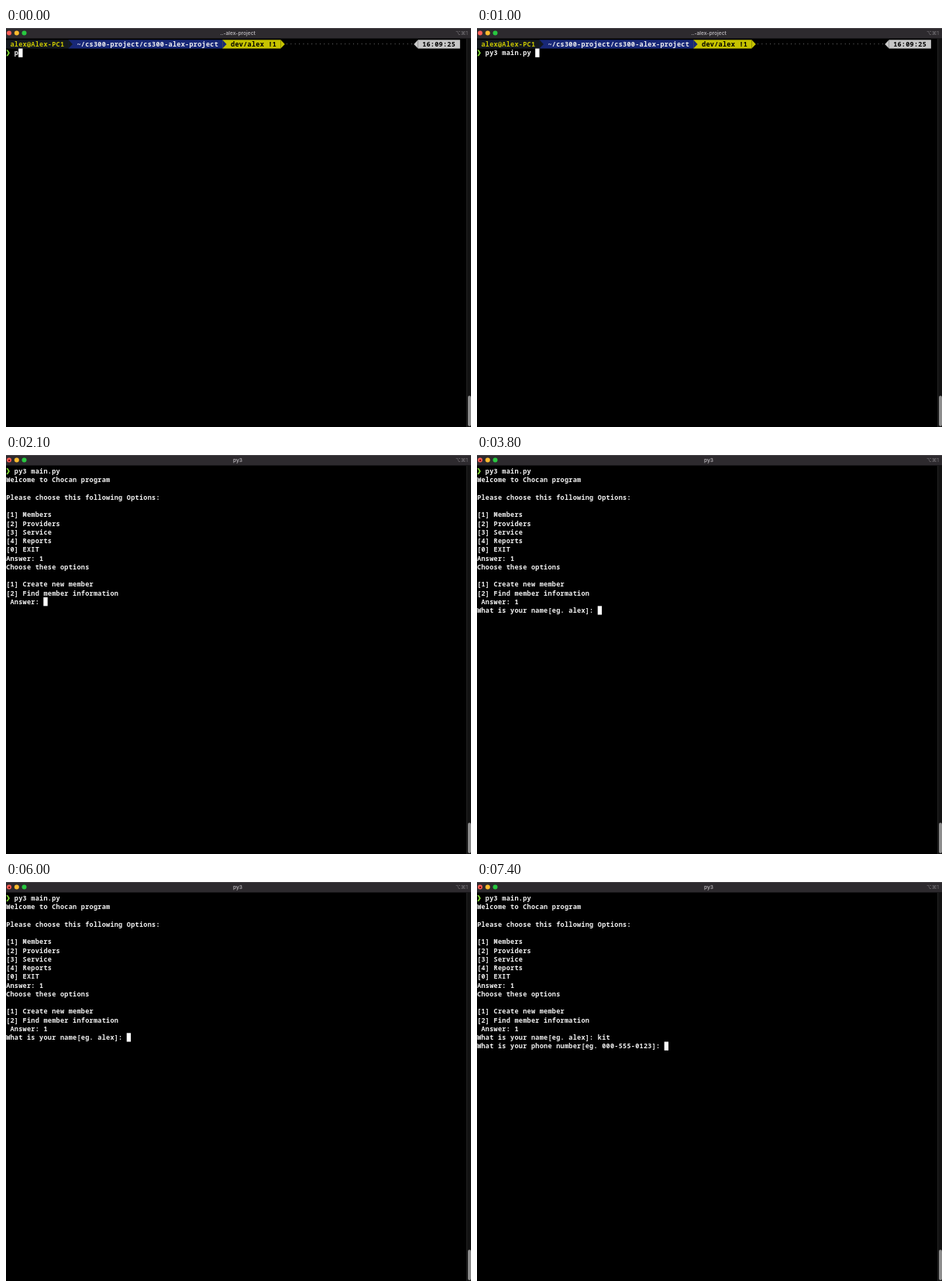
Write an HTML page with a canvas that moves like this. It is 600x516 px and loops after 8 s.

```html
<!DOCTYPE html>
<html lang="en">
<head>
<meta charset="utf-8">
<title>Terminal session</title>
<style>
  html, body { margin: 0; width: 100%; height: 100%; overflow: hidden; background: #000; }
  canvas { display: block; width: 600px; height: 516px; }
</style>
</head>
<body>
<canvas id="screen" width="600" height="516"></canvas>
<script>
const ctx = document.getElementById('screen').getContext('2d');
const LOOP = 8000, CELL = 5.37, ROW = 11.25, TOP = 15.3;
const MONO = '600 8.5px "Noto Sans Mono", "DejaVu Sans Mono", monospace';
const SANS = 'Inter, "Open Sans", sans-serif';
const WHITE = '#f0f0f0', YELLOW = '#c7c400', NAVY = '#182878', SILVER = '#c7c7c7', DARK = '#14191e';

const COMMAND = 'py3 main.py ';
const MENU = ['Welcome to Chocan program', '', 'Please choose this following Options:', '',
  '[1] Members', '[2] Providers', '[3] Service', '[4] Reports', '[0] EXIT'];
const MEMBER_MENU = ['Choose these options', '', '[1] Create new member', '[2] Find member information'];

const colX = col => col * CELL;
const rowY = row => TOP + row * ROW;

function rect(x, y, w, h, color) {
  ctx.fillStyle = color;
  ctx.fillRect(x, y, w, h);
}

function dot(x, y, r, color) {
  ctx.fillStyle = color;
  ctx.beginPath();
  ctx.arc(x, y, r, 0, Math.PI * 2);
  ctx.fill();
}

function polygon(points, color) {
  ctx.fillStyle = color;
  ctx.beginPath();
  points.forEach(([x, y]) => ctx.lineTo(x, y));
  ctx.fill();
}

// Terminal text sits on a fixed character grid.
function write(text, col, row, color = WHITE) {
  ctx.font = MONO;
  ctx.textAlign = 'center';
  ctx.fillStyle = color;
  [...text].forEach((char, i) => ctx.fillText(char, colX(col + i + 0.5), rowY(row) + 8.7));
}

function label(text, x, align, color, weight, size) {
  ctx.font = `${weight} ${size}px ${SANS}`;
  ctx.textAlign = align;
  ctx.fillStyle = color;
  ctx.fillText(text, x, 9);
}

function drawWindow(title, running) {
  rect(0, 0, 600, 516, '#000');
  rect(0, 0, 600, 13.5, '#2d2a2e');
  rect(0, 0, 600, 0.7, '#525054');
  dot(4, 6.5, 3, '#ff5f57');
  dot(13.8, 6.5, 3, '#febc2e');
  dot(23.5, 6.5, 3, '#28c840');
  if (running) dot(4.2, 6.9, 1.2, '#7d0a06');
  label(title, 299, 'center', '#b3b0b4', 600, 6.6);
  label('⌥⌘1', 596, 'right', '#7b787c', 400, 6.6);

  rect(594, 14, 6, 502, '#121212');
  rect(594, 14, 0.7, 502, '#2a2a2a');
  ctx.fillStyle = '#8d8d8d';
  ctx.beginPath();
  ctx.roundRect(596, 475.5, 4, 39.5, 2);
  ctx.fill();
}

function drawChevron(row) {
  const y = rowY(row) + 1.6;
  polygon([[0.4, y], [2.3, y], [4.9, y + 4], [2.3, y + 8], [0.4, y + 8], [2.8, y + 4]], '#83dc35');
}

// A wedge fills one cell and points left (-1) or right (1).
function wedge(col, direction, color) {
  const base = colX(direction > 0 ? col : col + 1), y = rowY(0);
  polygon([[base, y], [base + direction * CELL, y + ROW / 2], [base, y + ROW]], color);
}

function segment(from, to, color) {
  rect(colX(from), rowY(0), colX(to - from), ROW, color);
}

function drawPrompt() {
  segment(0, 15, DARK);
  segment(15, 52, NAVY);
  wedge(15, 1, DARK);
  segment(52, 66, YELLOW);
  wedge(52, 1, NAVY);
  wedge(66, 1, YELLOW);
  wedge(98, -1, SILVER);
  segment(99, 109.1, SILVER);
  for (let col = 67; col < 98; col++) dot(colX(col + 0.5), 20.6, 0.55, '#747474');
  write('alex@Alex-PC1', 1, 0, YELLOW);
  write('~/cs300-project/cs300-alex-project', 17, 0);
  write('dev/alex !1', 54, 0, '#000');
  write('16:09:25', 100, 0, '#000');
}

// Lines on screen at time t; the cursor follows the last one.
function programLines(t) {
  const lines = ['  ' + COMMAND, ...MENU, 'Answer: ' + (t >= 2000 ? '1' : '')];
  if (t >= 2100) lines.push(...MEMBER_MENU, ' Answer: ' + (t >= 3400 ? '1' : ''));
  if (t >= 3800) {
    const typed = Math.max(0, Math.floor((t - 6900) / 100));
    lines.push('What is your name[eg. alex]: ' + 'kit'.slice(0, typed));
  }
  if (t >= 7400) lines.push('What is your phone number[eg. 000-555-0123]: ');
  return lines;
}

function cursorVisible(t) {
  return !(t >= 4400 && t < 5000 || t >= 5500 && t < 6000 || t >= 6500 && t < 7000);
}

function draw(t) {
  const running = t >= 1100;
  drawWindow(running ? 'py3' : '..-alex-project', t >= 1800);
  let lines, firstRow;
  if (running) {
    lines = programLines(t);
    firstRow = 0;
  } else {
    drawPrompt();
    // One key per tick; the last tick completes the file name.
    const typed = t >= 1000 ? COMMAND.length : 1 + Math.floor(t / 100);
    lines = ['  ' + COMMAND.slice(0, typed)];
    firstRow = 1;
  }
  drawChevron(firstRow);
  lines.forEach((line, i) => write(line, 0, firstRow + i));
  if (cursorVisible(t)) {
    rect(colX(lines.at(-1).length), rowY(firstRow + lines.length - 1), CELL, ROW, '#fff');
  }
}

const start = performance.now();
function tick() {
  draw((performance.now() - start) % LOOP);
  requestAnimationFrame(tick);
}
tick();
</script>
</body>
</html>
```
